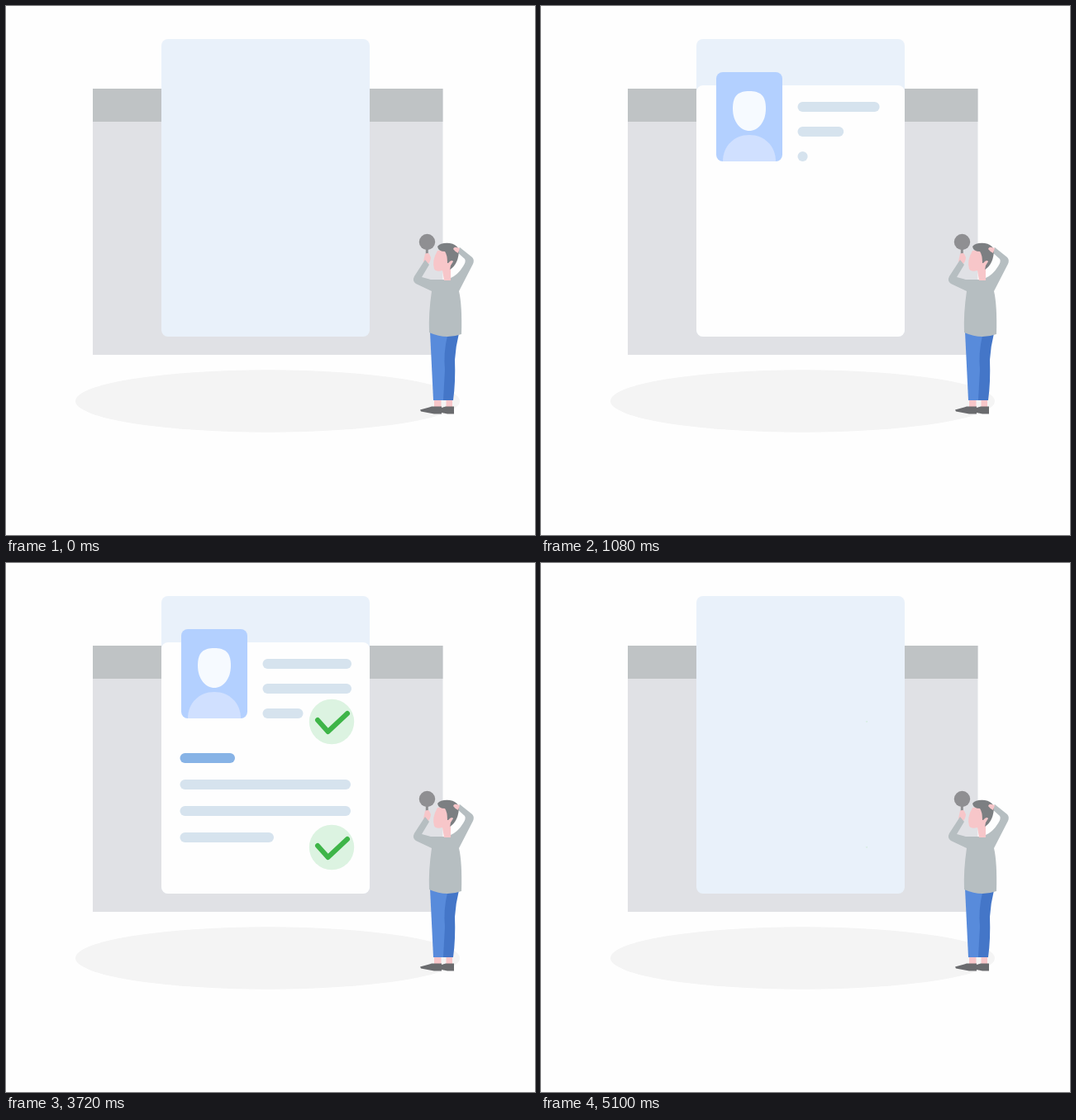
Recreate the animation shown at these times as an HTML page with a canvas. Size 640 by 640 pixels, loop 5.43 s.

```html
<!DOCTYPE html>
<html lang="en">
<head>
<meta charset="utf-8">
<title>Profile check</title>
<style>
html, body { margin: 0; width: 100%; height: 100%; overflow: hidden; background: #fefefe; }
canvas { display: block; width: 100vw; height: 100vh; }
</style>
</head>
<body>
<canvas id="stage" width="640" height="640"></canvas>
<script>
const LOOP = 5430;
const ctx = document.getElementById('stage').getContext('2d');

const linear = (t, from, to) => Math.min(1, Math.max(0, (t - from) / (to - from)));
const ease = (t, from, to) => { const u = linear(t, from, to); return u * u * (3 - 2 * u); };

function box(x, y, w, h, r, color) {
  if (w <= 0 || h <= 0) return;
  ctx.fillStyle = color;
  ctx.beginPath();
  ctx.roundRect(x, y, w, h, Math.min(r, w / 2, h / 2));
  ctx.fill();
}

function disc(x, y, rx, ry, color) {
  ctx.fillStyle = color;
  ctx.beginPath();
  ctx.ellipse(x, y, rx, ry, 0, 0, 7);
  ctx.fill();
}

function shape(d, color) {
  ctx.fillStyle = color;
  ctx.fill(new Path2D(d));
}

function scaled(x, y, s, draw) {
  if (s <= 0) return;
  ctx.save();
  ctx.translate(x, y);
  ctx.scale(s, s);
  ctx.translate(-x, -y);
  draw();
  ctx.restore();
}

function drawScene() {
  box(0, 0, 640, 640, 0, '#fefefe');
  disc(316.5, 478, 232.5, 37.7, '#f4f4f4');
  box(105, 100, 423.5, 322, 0, '#e0e1e5');
  box(105, 100, 423.5, 40, 0, '#bfc3c5');
  box(188, 40, 252, 360, 8, '#e9f1fa');
}

function drawCard(t) {
  const sx = 0.92 + 0.08 * (ease(t, 450, 780) - ease(t, 4350, 4650));
  const sy = 1.053 * ease(t, 0, 600) - 0.053 * ease(t, 620, 900)
           + 0.045 * ease(t, 4320, 4530) - 1.045 * ease(t, 4530, 5090);
  if (sy > 0.0005) box(314 - 126 * sx, 400 - 304 * sy, 252 * sx, 304 * sy, 8, '#fefefe');
}

function drawPortrait(t) {
  const k = ease(t, 470, 760) - ease(t, 3960, 4260);
  const mix = (a, b) => Math.round(a + (b - a) * k);
  box(252 - 40 * k, 134 - 54 * k, 80 * k, 108 * k, 8,
    `rgb(${mix(126, 179)},${mix(156, 208)},${mix(223, 255)})`);
  const figure = ease(t, 720, 1000) - ease(t, 3840, 4080);
  scaled(252, 188, figure, () =>
    shape('M220 188C220 169 234 156 252 156S284 169 284 188Z', '#d0e0ff'));
  scaled(252, 127, figure, () =>
    shape('M232 124C232 108 239 103 252 103S272 108 272 124C272 141 262 151 252 151S232 141 232 124Z', '#f6faff'));
}

function drawLine(t, x, y, width, start, end, leave, color = '#d6e3ee') {
  const k = linear(t, start, end) - linear(t, leave, leave + 330);
  if (k > 0) box(x, y - 6, 12 + (width - 12) * k, 12, 6, color);
}

function drawLines(t) {
  drawLine(t, 310.5, 122, 107.5, 780, 1110, 3900);
  drawLine(t, 310.5, 152, 107.5, 930, 1260, 3870);
  drawLine(t, 310.5, 182, 49, 1080, 1380, 3840);
  drawLine(t, 210.5, 236, 66.5, 1890, 2280, 3810, '#87b3e6');
  drawLine(t, 210.5, 268, 206.5, 2070, 2400, 3780);
  drawLine(t, 210.5, 300, 206.5, 2270, 2600, 3750);
  drawLine(t, 210.5, 332, 117, 2460, 2760, 3710);
}

function drawTick(t, y, start, leave) {
  const s = 1.057 * ease(t, start, start + 270) - 0.057 * ease(t, start + 270, start + 450)
          - 0.975 * ease(t, leave, leave + 400);
  scaled(394, y, s, () => {
    disc(394, y, 27.2, 27.2, '#dcf3e1');
    const k = ease(t, start + 255, start + 525);
    if (k <= 0) return;
    ctx.strokeStyle = '#3eb548';
    ctx.lineWidth = 6;
    ctx.lineCap = ctx.lineJoin = 'round';
    const length = Math.hypot(12.5, 14) + Math.hypot(23.5, 22);
    ctx.setLineDash([length * k, 99]);
    ctx.beginPath();
    ctx.moveTo(377, y - 2);
    ctx.lineTo(389.5, y + 12);
    ctx.lineTo(413, y - 10);
    ctx.stroke();
  });
}

function drawMan() {
  const skin = '#f7c6c9', knit = '#b6bec1', shoe = '#6a6b6e';
  // legs and shoes
  box(518, 475, 8.5, 11, 0, skin);
  box(532.5, 475, 7.5, 11, 0, skin);
  shape('M527 486L532 484.5H542V493.5H534L527 492Z', shoe);
  shape('M501 488.5L512 485.5L515 484.5H527V493.5H518L502 490.5Z', shoe);
  shape('M513 394L517 477H530L537 399Z', '#588bdb');
  shape('M534 399Q529 420 531 440L529 477H541Q544 455 543 428Q544 412 548 396Z', '#4476c8');
  // mirror and hand
  ctx.setLineDash([]);
  disc(509.5, 285.5, 9.7, 9.7, '#8f8f92');
  box(507.8, 294, 3, 8, 0, '#8f8f92');
  shape('M507 300Q510 298 512 300L514 304Q514 309 510 313L505 309Z', skin);
  // sweater with both sleeves
  shape('M507 307L494 327Q491 333 496 336L515 345Q511 372 512 395Q532 404 551 397'
    + 'Q552 362 548 345L565 312Q567 307 564 304L549 292L545 297L555 306Q557 309 553 315'
    + 'Q547 325 538 329L530 331H514L503 328L512 313Z', knit);
  // head
  shape('M522 296Q515 308 518 318Q520 322 528 320L530 332H538V317L541 308L535 295Z', skin);
  shape('M522 291Q526 286 537 287Q544 288 548 294Q548 312 537 319L538 314L541 309'
    + 'Q539 306 535 311H534Q534 301 531 297Q523 297 522 291Z', '#7c7f82');
  shape('M541 294Q542 291 545 292L549 293L547 299Q543 297 541 294Z', skin);
}

function frame(now) {
  const t = now % LOOP;
  drawScene();
  drawCard(t);
  drawPortrait(t);
  drawLines(t);
  drawTick(t, 192, 1080, 3780);
  drawTick(t, 344, 2610, 3720);
  drawMan();
  requestAnimationFrame(frame);
}
requestAnimationFrame(frame);
</script>
</body>
</html>
```
